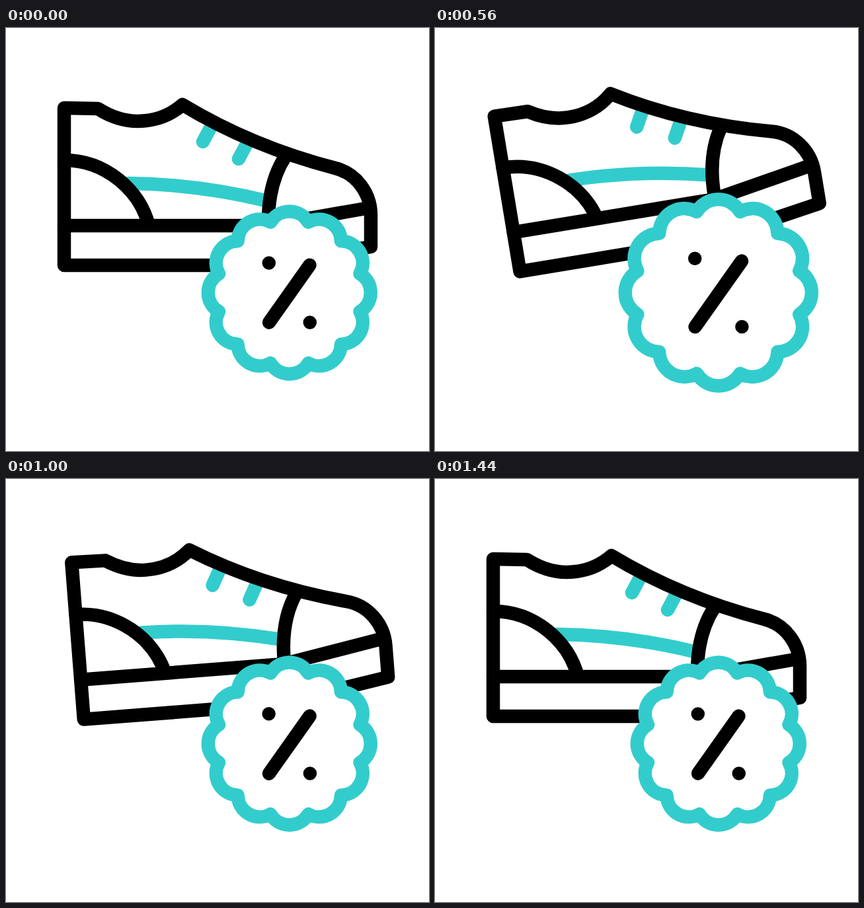
These frames come from a looping animation (640 by 640 pixels, 1520 ms). An HTML page:

```html
<!DOCTYPE html>
<html lang="en">
<head>
<meta charset="utf-8">
<title>Shoe discount</title>
<style>
  html, body { margin: 0; height: 100%; overflow: hidden; background: #fff; }
  svg { display: block; width: 100vw; height: 100vh; }
  path {
    fill: none; stroke: #000; stroke-width: 20.5;
    stroke-linecap: round; stroke-linejoin: round;
    vector-effect: non-scaling-stroke;
  }
  .teal { stroke: #33cccc; }
  #badge { fill: #fff; }
</style>
</head>
<body>
<svg viewBox="0 0 640 640">
  <g id="shoe">
    <path class="teal" d="M185 235Q290 236 396 262M312 146L298 172M366 172L352 198"/>
    <path d="M88 359V121L139 122C158 134 178 141 199 141C225 141 249 132 267 116
             C315 145 390 184 498 212C530 220 552 250 552 283V331L382 359Z"/>
    <path d="M88 200C150 200 203 245 216 299M88 299H396L550 272M423.5 193C405.5 220 397 255 397 292"/>
  </g>
  <path id="badge" class="teal"/>
  <path id="percent" d="M30.7-41.7L-30.7 45M-31-45h.01M31 45h.01"/>
</svg>
<script>
const LOOP = 1520, STEP = 40;
const [shoe, badge, percent] = ['shoe', 'badge', 'percent'].map(id => document.getElementById(id));

const smooth = u => u * u * (3 - 2 * u);
const smoother = u => u * u * u * (10 + u * (6 * u - 15));

// Eased value at time t through [time, value] keys.
function track(keys, t, ease) {
  const next = keys.findIndex(([time]) => time > t);
  if (next < 0) return keys[keys.length - 1][1];
  if (next === 0) return keys[0][1];
  const [t0, v0] = keys[next - 1], [t1, v1] = keys[next];
  return v0 + (v1 - v0) * ease((t - t0) / (t1 - t0));
}

const tilt = [[0, 0], [170, 5.1], [195, 5.1], [435, 10], [485, 10], [812, 2.5], [1105, 5.1], [1365, 0]];
const slide = [[93, 0], [604, 33.4], [803, 33.4], [1398, 0]];
const badgeScale = [[36, 1], [521, 1.15], [985, 1]];
const percentScale = [[120, 1], [590, 1.15], [1050, 1]];

// Badge rim: twelve arcs between notches.
let rim = '';
for (let i = 0; i <= 12; i++) {
  const a = (i * 30 - 15) * Math.PI / 180;
  const point = `${110.5 * Math.sin(a)} ${-110.5 * Math.cos(a)}`;
  rim += i ? `A33.3 33.3 0 0 1 ${point}` : `M${point}`;
}
badge.setAttribute('d', rim + 'Z');

function draw(now) {
  const t = Math.min(Math.floor(now % LOOP / STEP) * STEP, 1440);
  const grow = keys => `translate(428.8 400.4) scale(${track(keys, t, smooth)})`;
  shoe.setAttribute('transform',
    `translate(${track(slide, t, smoother)}) rotate(${-track(tilt, t, smoother)} 149 319)`);
  badge.setAttribute('transform', grow(badgeScale));
  percent.setAttribute('transform', grow(percentScale));
}

const start = performance.now();
function loop() {
  draw(performance.now() - start);
  requestAnimationFrame(loop);
}
loop();
</script>
</body>
</html>
```
